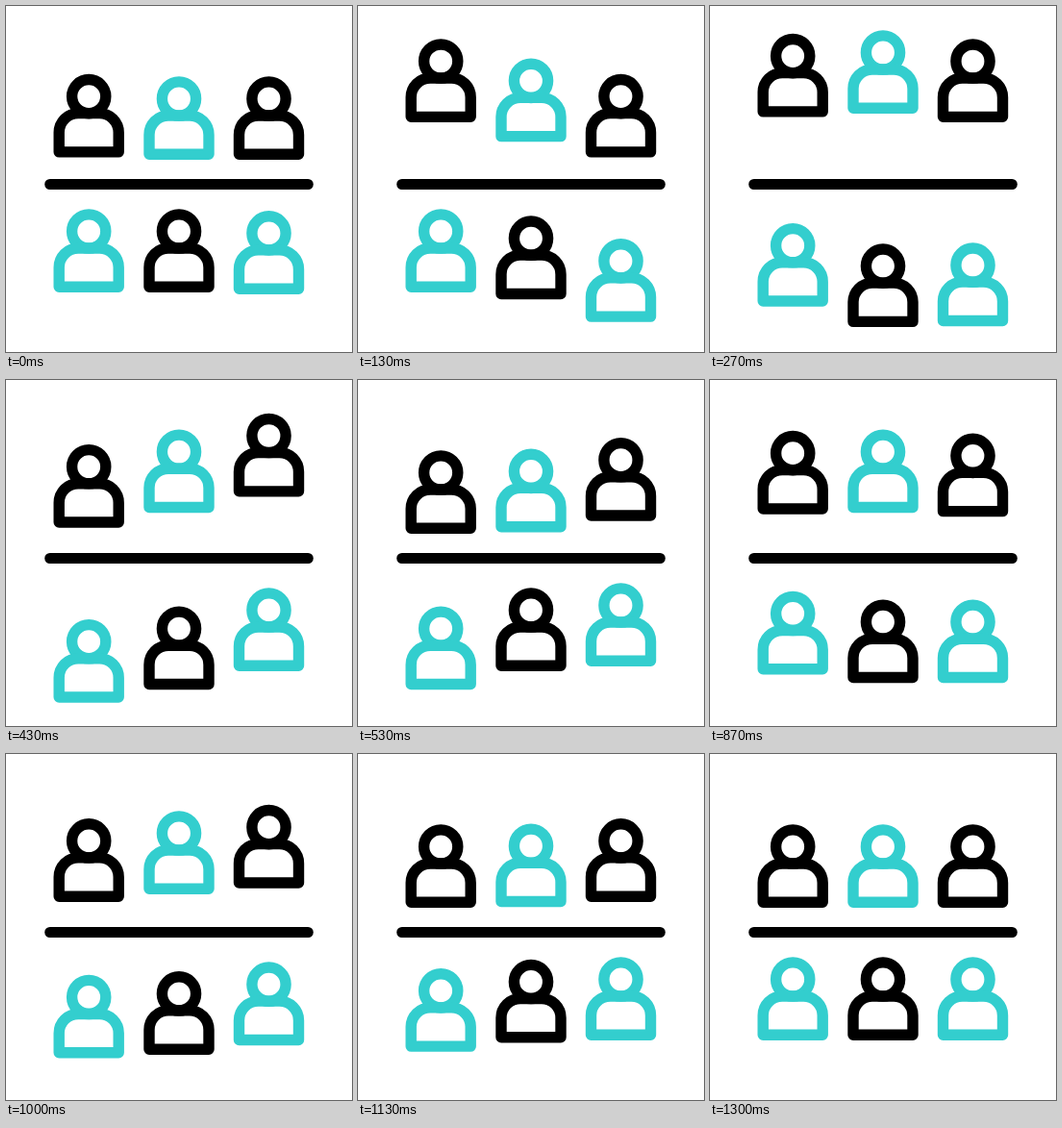
An HTML page with a canvas for the animation above (1670 ms loop, 360 by 360 pixels).

```html
<!DOCTYPE html>
<html lang="en">
<head>
<meta charset="utf-8">
<title>Two teams</title>
<style>
html, body { margin: 0; width: 100%; height: 100%; overflow: hidden; background: #fff; }
canvas { display: block; }
</style>
</head>
<body>
<canvas id="stage" width="360" height="360"></canvas>
<script>
const ctx = document.getElementById('stage').getContext('2d');
const LOOP = 1670;
const STEP = 33.4;
const BLACK = '#000';
const TEAL = '#33cece';

// delay is in steps; first and second are hop distances (negative is up)
const rows = [
  { y: 0, first: -48, second: -22, delays: [0, 2, 4], colors: [BLACK, TEAL, BLACK] },
  { y: 138, first: 38, second: 18.6, delays: [6, 3, 0], colors: [TEAL, BLACK, TEAL] }
];
const columns = [86.2, 180, 273.5];

function ease(from, to, t) {
  const p = Math.min(1, Math.max(0, (t - from) / (to - from)));
  return (1 - Math.cos(Math.PI * p)) / 2;
}

function hop(row, t) {
  return row.first * (ease(0, 7, t) - ease(7.5, 16, t)) +
    row.second * (ease(17, 25.5, t) - ease(25.5, 34, t));
}

function drawPerson(x, y, color) {
  ctx.save();
  ctx.translate(x, y);
  ctx.strokeStyle = color;
  ctx.lineWidth = 11.4;

  ctx.beginPath();
  ctx.arc(0, 96.5, 17.6, 0, Math.PI * 2);
  ctx.stroke();

  ctx.beginPath();
  ctx.moveTo(-31, 154.3);
  ctx.lineTo(-31, 134);
  ctx.arcTo(-31, 114, -11, 114, 20);
  ctx.lineTo(11, 114);
  ctx.arcTo(31, 114, 31, 134, 20);
  ctx.lineTo(31, 154.3);
  ctx.closePath();
  ctx.stroke();
  ctx.restore();
}

function drawDivider() {
  ctx.strokeStyle = BLACK;
  ctx.lineWidth = 11;
  ctx.beginPath();
  ctx.moveTo(45.7, 185.5);
  ctx.lineTo(314.3, 185.5);
  ctx.stroke();
}

function draw(ms) {
  const step = 1 + Math.floor((ms % LOOP + 6) / STEP);
  ctx.fillStyle = '#fff';
  ctx.fillRect(0, 0, 360, 360);
  ctx.lineCap = ctx.lineJoin = 'round';
  drawDivider();
  for (const row of rows) {
    columns.forEach((x, i) => {
      drawPerson(x, row.y + hop(row, step - row.delays[i]), row.colors[i]);
    });
  }
}

const start = performance.now();
function tick() {
  draw(performance.now() - start);
  requestAnimationFrame(tick);
}
tick();
</script>
</body>
</html>
```
